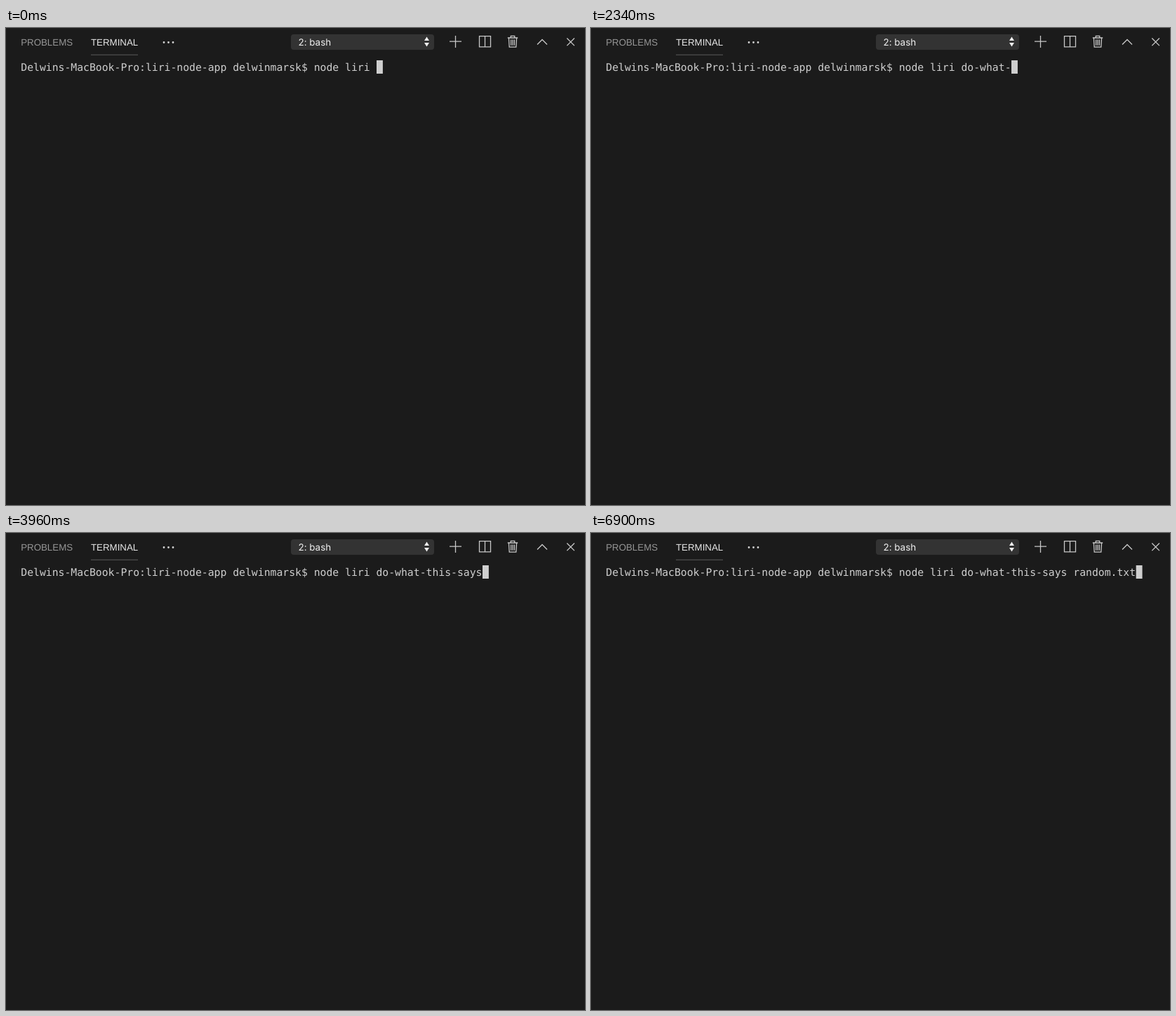
Recreate the animation shown at these times as an HTML page. Size 825x679 px, loop 8 s.

```html
<!DOCTYPE html>
<html lang="en">
<head>
<meta charset="utf-8">
<title>Terminal</title>
<style>
  html, body { margin: 0; width: 100%; height: 100%; overflow: hidden; background: #1b1b1b; }
  svg { display: block; }
  text { text-rendering: geometricPrecision; white-space: pre; }
  .tab { font: 13.3px "Liberation Sans", Arial, sans-serif; }
  .select { font: 13.4px Inter, sans-serif; fill: #f0f0f0; }
  .mono { font: 14.75px "DejaVu Sans Mono", monospace; fill: #cfcfcf; }
  .icons { fill: none; stroke: #c8c8c8; stroke-width: 1.3; }
  .dots { stroke: #d4d4d4; stroke-width: 2.8; stroke-linecap: round; stroke-dasharray: 0 6.5; }
</style>
</head>
<body>
<svg width="825" height="679" viewBox="0 0 825 679">
  <text class="tab" x="21.2" y="25" fill="#969696">PROBLEMS</text>
  <text class="tab" x="121" y="25" fill="#e7e7e7">TERMINAL</text>
  <rect x="121" y="37.7" width="67" height="1" fill="#5a5a5a"/>
  <path class="dots" d="M225 20.5h13.1"/>
  <rect x="406" y="9" width="204" height="22" rx="4" fill="#333"/>
  <text class="select" x="416.5" y="24.5">2: bash</text>
  <path fill="#eee" d="M596 18l3.5-5.5 3.5 5.5zM596 21h7l-3.5 5.5z"/>
  <g class="icons">
    <path d="M632 19.2h17M640.5 11v17"/>
    <path d="M674.5 11.7h16v15.2h-16zM682.5 11.7v15.2"/>
    <path d="M714.8 14h14.4M719.3 14v-2.6h5.4V14M716.4 14l.8 13.2h9.6l.8-13.2M719.6 16.6v8.2M722 16.6v8.2M724.4 16.6v8.2"/>
    <path d="M757 23.5l7-7 7 7"/>
    <path d="M799.3 14.5l10.6 10.6m0-10.6l-10.6 10.6"/>
  </g>
  <text id="line" class="mono" x="21.3" y="61"></text>
  <rect id="cursor" y="46" width="8.9" height="19" fill="#cfcfcf"/>
</svg>
<script>
  const LOOP = 8000, CELL = 8.88, CURSOR_START = 528;
  const prompt = 'Delwins-MacBook-Pro:liri-node-app delwinmarsk$ node liri ';
  // Typing bursts: text, time of its first key, time of its last key (ms)
  const bursts = [
    ['do', 120, 480], ['-', 1020], ['what', 1560, 1800], ['-', 2340],
    ['this', 2580, 2760], ['-', 3120], ['says', 3540, 3960], [' ', 4500],
    ['random', 4740, 5280], ['.t', 5940, 6180], ['xt', 6660, 6840]
  ];
  const line = document.getElementById('line');
  const cursor = document.getElementById('cursor');

  // Keys within a burst are evenly spaced
  function typedPart([text, first, last = first], t) {
    if (t < first) return '';
    if (t >= last) return text;
    return text.slice(0, 1 + Math.floor((t - first) / (last - first) * (text.length - 1)));
  }

  function render() {
    const t = performance.now() % LOOP;
    const typed = bursts.map(burst => typedPart(burst, t)).join('');
    line.textContent = prompt + typed;
    cursor.setAttribute('x', CURSOR_START + typed.length * CELL);
    requestAnimationFrame(render);
  }
  render();
</script>
</body>
</html>
```
